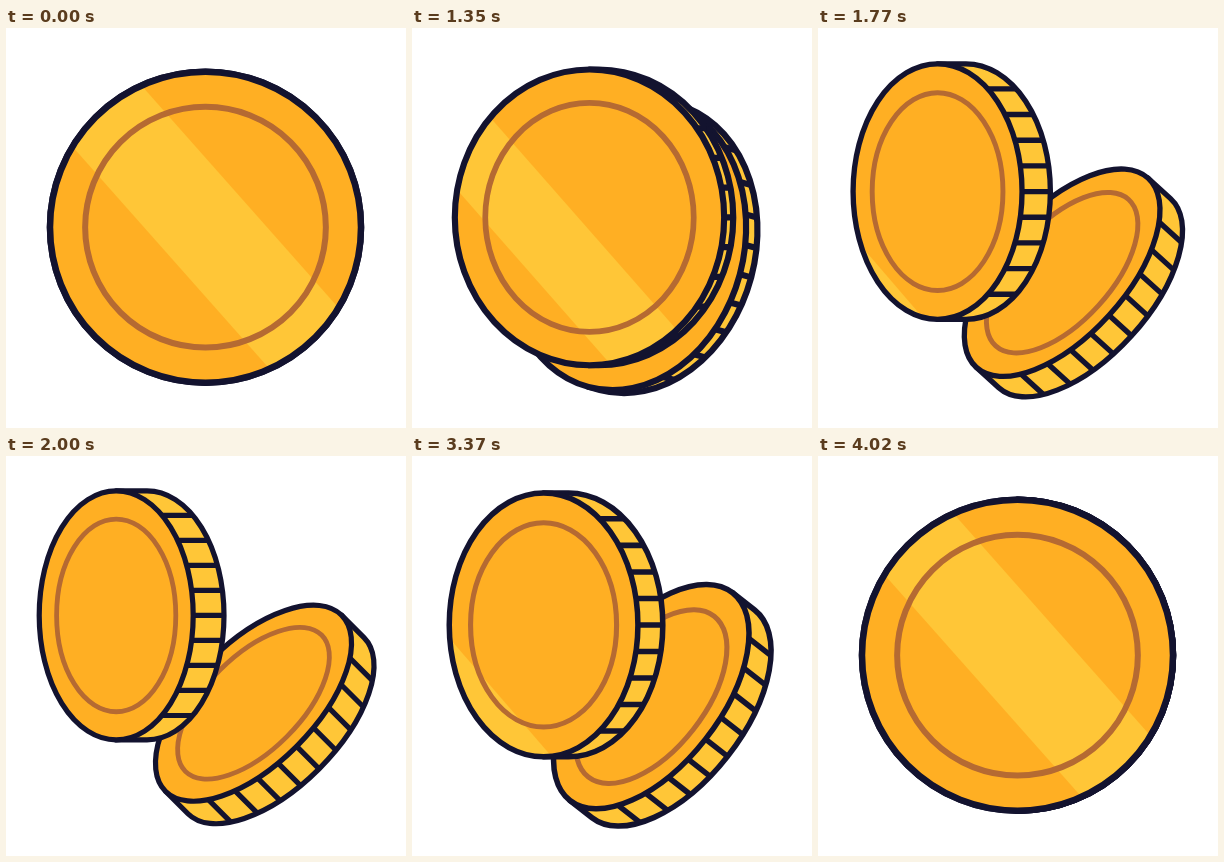
Animation, 400 px wide and 400 px high, one loop 4.05 s. Source, as an HTML page with a canvas:

```html
<!DOCTYPE html>
<html lang="en">
<head>
<meta charset="utf-8">
<title>Coins</title>
<style>
  html, body { margin: 0; width: 100%; height: 100%; overflow: hidden; background: #fff; }
  canvas { display: block; width: 400px; height: 400px; }
</style>
</head>
<body>
<canvas id="stage" width="400" height="400"></canvas>
<script>
const ctx = document.getElementById('stage').getContext('2d');
const LOOP = 4050, MOVE = 1000, OPEN_AT = 1000, CLOSE_AT = 3025;
const RADIUS = 155.5;
const INK = '#13132f', FACE = '#ffaf23', LIGHT = '#ffc637', RING = '#b56a32';

const clamp = x => Math.min(1, Math.max(0, x));
const ease = x => x < 0.5 ? 2 * x * x : 1 - 2 * (1 - x) ** 2;

// Blend from a to b with an extra bulge between the ends.
const blend = (a, b, p, bulge = 0) => a + (b - a) * p + bulge * p * (1 - p);

function ellipse(rx, ry) {
  ctx.beginPath();
  ctx.ellipse(0, 0, rx, ry, 0, 0, 2 * Math.PI);
}

function drawShine({ rx, ry }, p) {
  const right = rx * (0.396 - 1.955 * p - 0.25 * p ** 8);
  const left = rx * (-0.396 - 1.65 * p - 0.25 * p ** 8);
  const reach = 200, lean = reach / (1.128 + 0.04 * p);
  ctx.save();
  ellipse(rx, ry);
  ctx.clip();
  ctx.beginPath();
  ctx.moveTo(left - lean, -reach);
  ctx.lineTo(right - lean, -reach);
  ctx.lineTo(right + lean, reach);
  ctx.lineTo(left + lean, reach);
  ctx.fillStyle = LIGHT;
  ctx.fill();
  ctx.restore();
}

function drawEdge({ rx, ry, depth }) {
  ctx.beginPath();
  ctx.moveTo(0, -ry);
  ctx.lineTo(depth, -ry);
  ctx.ellipse(depth, 0, rx, ry, 0, -Math.PI / 2, Math.PI / 2);
  ctx.lineTo(0, ry);
  ctx.closePath();
  ctx.fillStyle = LIGHT;
  ctx.fill();
  ctx.stroke();

  ctx.beginPath();
  for (let i = -4; i <= 4; i++) {
    const y = i * 0.201, x = rx * Math.sqrt(1 - y * y);
    ctx.moveTo(x, y * ry);
    ctx.lineTo(x + depth, y * ry);
  }
  ctx.stroke();
}

function drawCoin(coin, shine) {
  const { x, y, rx, ry, tilt, depth } = coin;
  const scale = ry / RADIUS;
  ctx.save();
  ctx.translate(x, y);
  ctx.rotate(tilt * Math.PI / 180);
  ctx.lineJoin = 'round';
  ctx.strokeStyle = INK;
  ctx.lineWidth = 6.5 * scale;
  if (depth > 0) drawEdge(coin);

  ellipse(rx, ry);
  ctx.fillStyle = FACE;
  ctx.fill();
  if (shine !== undefined) drawShine(coin, shine);

  ellipse(rx * 0.774, ry * 0.774);
  ctx.strokeStyle = RING;
  ctx.lineWidth = 6 * scale;
  ctx.stroke();

  ellipse(rx, ry);
  ctx.strokeStyle = INK;
  ctx.lineWidth = 6.5 * scale;
  ctx.stroke();
  ctx.restore();
}

function render(time) {
  const t = time % LOOP;
  const p = ease(clamp((t - OPEN_AT) / MOVE)) - ease(clamp((t - CLOSE_AT) / MOVE));
  const ry = blend(RADIUS, 124.5, p);

  ctx.fillStyle = '#fff';
  ctx.fillRect(0, 0, 400, 400);
  drawCoin({
    x: blend(199.5, 247.5, p, 18), y: blend(199.2, 247.2, p, 27),
    rx: blend(RADIUS, 61, p, -81), ry,
    tilt: blend(0, 45, p, 21), depth: blend(0, 31.8, p, 21)
  });
  drawCoin({
    x: blend(199.5, 110.2, p), y: blend(199.2, 159.4, p),
    rx: blend(RADIUS, 77, p, -8), ry,
    tilt: 0, depth: blend(0, 30.8, p, 8)
  }, p);
}

const start = performance.now();
function tick() {
  render(performance.now() - start);
  requestAnimationFrame(tick);
}
tick();
</script>
</body>
</html>
```
